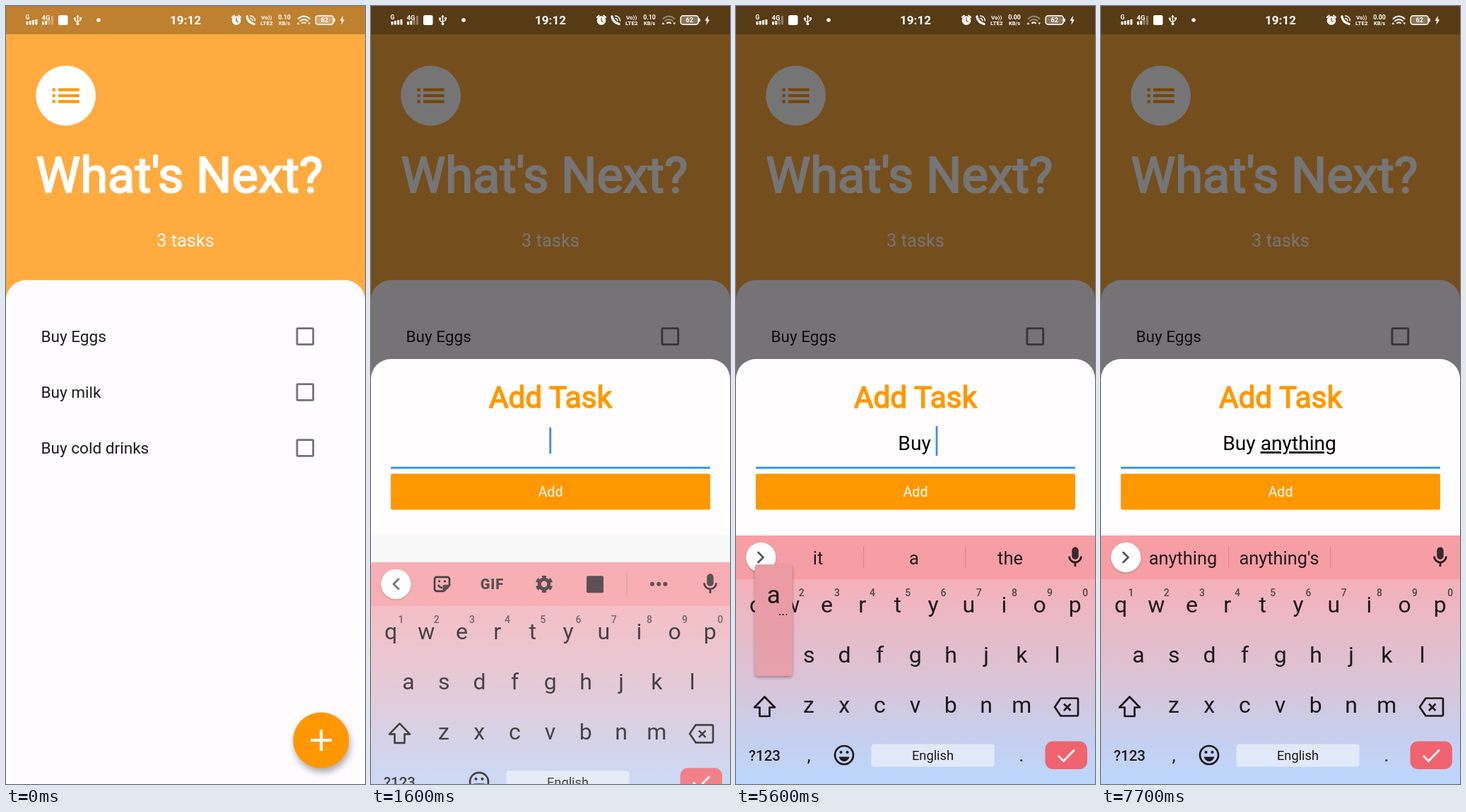
Recreate the animation shown at these times as an HTML page. Size 508 px wide and 1102 px high, loop 8 s.

```html
<!DOCTYPE html>
<html lang="en">
<head>
<meta charset="utf-8">
<title>Task list</title>
<style>
html, body { margin: 0; width: 100%; height: 100%; overflow: hidden; background: #fffcff; }
svg { display: block; }
text { font-family: Roboto, sans-serif; }
.mid { text-anchor: middle; }
.line { fill: none; stroke-linecap: round; stroke-linejoin: round; }
.faux { stroke-linejoin: round; }
.word { text-decoration: underline; text-decoration-skip-ink: none; }
.ink { fill: #1e181c; }
.icon { fill: #38282c; }
.pen { fill: none; stroke: #1e181c; stroke-width: 2.7; stroke-linejoin: round; }
</style>
</head>
<body>
<svg width="508" height="1102" viewBox="0 0 508 1102">
  <defs>
    <linearGradient id="sky" x1="0" y1="0" x2="0" y2="1">
      <stop offset="0" stop-color="#f5b1b9"/>
      <stop offset=".5" stop-color="#dac4d7"/>
      <stop offset=".8" stop-color="#c5d0f0"/>
      <stop offset="1" stop-color="#bcd7fe"/>
    </linearGradient>
    <linearGradient id="pop" x1="0" y1="0" x2="0" y2="1">
      <stop offset="0" stop-color="#ec9aa3"/>
      <stop offset="1" stop-color="#e5a1ad"/>
    </linearGradient>
  </defs>

  <!-- list screen -->
  <rect width="508" height="430" fill="#ffab40"/>
  <rect width="508" height="40" fill="#bf802f"/>
  <circle cx="84.6" cy="127" r="42.4" fill="#fff"/>
  <path transform="translate(59.2 101.6) scale(2.117)" fill="#ff9800"
    d="M3 7h2v2H3zM7 7h14v2H7zM3 11h2v2H3zM7 11h14v2H7zM3 15h2v2H3zM7 15h14v2H7z"/>
  <text class="faux" x="42.5" y="264" font-size="70.6" fill="#fff" stroke="#fff" stroke-width="2.2">What's Next?</text>
  <text class="mid" x="254" y="341" font-size="25.4" fill="#fff">3 tasks</text>
  <path d="M0 1102V416.500a28.200 28.200 0 0 1 28.200-28.200H479.800a28.200 28.200 0 0 1 28.200 28.200V1102z" fill="#fffcff"/>
  <g id="tasks" font-size="22.6" fill="#1c1b1f"></g>
  <g style="filter:drop-shadow(2px 6px 5px rgba(0,0,0,.32))">
    <circle cx="445.800" cy="1040" r="39.600" fill="#ff9800"/>
  </g>
  <path d="M431 1040h30M446 1025v30" stroke="#fff" stroke-width="4.100"/>

  <rect id="scrim" width="508" height="1102" opacity="0"/>

  <!-- status bar -->
  <g fill="#fff" font-weight="700">
    <text x="27.500" y="19" font-size="8.500">G</text>
    <path d="M28.500 22h3v4.500h-3zM32.800 21h3v5.500h-3zM37.100 20h3v6.500h-3zM41.400 19h3v7.500h-3z"/>
    <text x="50.500" y="19.500" font-size="9.500">4G</text>
    <path d="M51 22h3v4.500h-3zM55.300 21h3v5.500h-3z"/>
    <path d="M59.600 20h3v6.500h-3zM63.900 14h3v12.500h-3z" opacity=".35"/>
    <rect x="74" y="13" width="13.500" height="14" rx="2.500"/>
    <path class="line" d="M101.500 15v10M97.500 18v2.500l4 3M105.500 18v2l-4 2.500" stroke="#fff" stroke-width="1.400"/>
    <path d="M101.500 12.500l2.200 3.200h-4.400zM104 16h3v3h-3z"/>
    <circle cx="97.500" cy="18" r="1.700"/><circle cx="101.500" cy="25.300" r="1.900"/>
    <circle cx="131" cy="20" r="2.800"/>
    <text class="mid" x="254" y="26.300" font-size="17">19:12</text>
    <circle cx="326" cy="20.500" r="6.300"/>
    <path class="line" d="M319.800 16l3-2.500M332.200 16l-3-2.500" stroke="#fff" stroke-width="2"/>
    <path class="line" d="M326 17v4l2.500 1.500" stroke="#8a5f26" stroke-width="1.400"/>
    <path class="line" d="M341 15q1 8 10 10.500" stroke="#fff" stroke-width="3.300"/>
    <path class="line" d="M345.500 14q6 0 7 7M345.500 17.500q3 0 3.500 3.500" stroke="#fff" stroke-width="1.400"/>
    <text x="361" y="19" font-size="8">Vo))</text>
    <text x="360" y="26.500" font-size="8">LTE2</text>
    <text id="speed" class="mid" x="394" y="19" font-size="8.800">0.10</text>
    <text class="mid" x="394" y="26.500" font-size="7.500">KB/s</text>
    <g class="line" stroke="#fff" stroke-width="1.900">
      <path id="wifi" d="M413.500 18q8-7 16 0M416 21.300q5.500-4.500 11 0"/>
      <path d="M419 24.300q2.500-2 5 0"/>
    </g>
    <path d="M413.500 23l2 3h-4zM427.500 23.500h3.500l-1.700 3z"/>
    <rect x="438.200" y="13.700" width="25" height="12.600" rx="3.500" fill="#fff" fill-opacity=".3" stroke="#fff" stroke-width="1.500"/>
    <rect x="464" y="17.500" width="1.800" height="5" rx=".8"/>
    <text class="mid" x="450.700" y="23.300" font-size="9">62</text>
    <path d="M477 13.500l-4.500 7.200h2.700l-.8 6 4.700-7.500h-2.800z"/>
  </g>

  <!-- add-task sheet -->
  <g id="sheet">
    <rect y="240" width="508" height="362" fill="#f8f8f8"/>
    <path d="M0 250V28.200A28.200 28.200 0 0 1 28.200 0H479.800A28.200 28.200 0 0 1 508 28.200V250z" fill="#fffdfe"/>
    <text class="mid faux" x="254" y="69" font-size="42.300" fill="#ff9800" stroke="#ff9800" stroke-width="1.500">Add Task</text>
    <text id="field" class="mid" x="252.600" y="129" font-size="28.200"><tspan id="head"></tspan><tspan id="tail" class="word"></tspan></text>
    <rect id="caret" width="2.700" fill="#4285f4"/>
    <rect x="28" y="152.700" width="452" height="2.800" fill="#2196f3"/>
    <rect x="28" y="162.500" width="452" height="51" rx="2.800" fill="#ff9800"/>
    <text class="mid" x="254" y="195" font-size="19.750" fill="#fff">Add</text>
  </g>

  <!-- keyboard -->
  <g id="board">
    <rect y="750" width="508" height="62.500" fill="#f79ea5"/>
    <rect y="812" width="508" height="290" fill="url(#sky)"/>
    <circle cx="35.300" cy="781" r="21.200" fill="#fff" style="filter:drop-shadow(0 1px 1px rgba(0,0,0,.25))"/>
    <path id="chevron" class="line" stroke="#5b5356" stroke-width="2.800"/>
    <g id="tools" class="icon">
      <path class="pen" d="M93 771h15a3 3 0 0 1 3 3v9l-8 8h-10a3 3 0 0 1-3-3v-14a3 3 0 0 1 3-3z"/>
      <path d="M111 782v3l-6.500 6.500h-3v-6.500a3 3 0 0 1 3-3z"/>
      <path class="pen" stroke-width="2" d="M95 777h3M103 777h3M95 782q2 4 6 4"/>
      <text class="mid" x="171.500" y="788" font-size="20" font-weight="900" letter-spacing="1">GIF</text>
      <g fill="none" stroke="#38282c">
        <circle cx="245" cy="781" r="6.800" stroke-width="5"/>
        <circle cx="245" cy="781" r="10" stroke-width="4.400" pathLength="60" stroke-dasharray="5.500 4.500" stroke-dashoffset="-2.250"/>
      </g>
      <rect x="305" y="769.500" width="24" height="24" rx="2"/>
      <rect x="361.500" y="765" width="1" height="32" opacity=".25"/>
      <circle cx="398" cy="781" r="3"/><circle cx="407.200" cy="781" r="3"/><circle cx="416.400" cy="781" r="3"/>
    </g>
    <g id="hints" class="mid ink" font-size="25.400">
      <path d="M180.700 765v32M324.700 765v32" stroke="#38282c" stroke-opacity=".2"/>
      <text x="116" y="791"></text><text x="252" y="791"></text><text x="388" y="791"></text>
    </g>
    <rect class="icon" x="475.300" y="766.500" width="9.400" height="17.500" rx="4.700"/>
    <path class="pen" d="M471.500 779.500a8.500 8.500 0 0 0 17 0M480 788v6"/>
    <g id="keys" class="mid ink" font-size="32"></g>
    <path id="shift" class="pen" d="M40.500 978.500l14.500 15h-7.500v12.500h-14v-12.500h-7.500z"/>
    <path class="pen" d="M459.500 980.500h23a1.500 1.500 0 0 1 1.500 1.500v22a1.500 1.500 0 0 1-1.500 1.500h-23l-8.500-12.500zM464 988.500l9.500 9.500M473.500 988.500l-9.500 9.500"/>
    <g class="mid ink">
      <text x="40.500" y="1069" font-size="20.500" font-weight="500">?123</text>
      <text x="103" y="1070" font-size="26">,</text>
      <text x="404" y="1070" font-size="26">.</text>
      <circle class="pen" cx="153" cy="1061" r="13"/>
      <circle cx="148.500" cy="1057" r="2.100"/><circle cx="157.500" cy="1057" r="2.100"/>
      <path d="M145.500 1063.500h15q-2 6.500-7.500 6.500t-7.500-6.500z"/>
      <rect id="space" x="191.500" y="1045.500" width="174" height="32" rx="4" fill="#fff"/>
      <text x="278.500" y="1068" font-size="18.300">English</text>
    </g>
    <rect x="437.500" y="1041.500" width="59.500" height="39.500" rx="11" fill="#f0646f"/>
    <path d="M456 1062l7.500 7.500 15.500-16" fill="none" stroke="#fff" stroke-width="2.800"/>
    <g id="popup" class="mid ink">
      <rect x="-26.500" y="-129" width="53" height="158" rx="4.500" fill="url(#pop)" style="filter:drop-shadow(0 2px 2px rgba(60,20,30,.4))"/>
      <text y="-74" font-size="35"></text>
      <text x="13.500" y="-57" font-size="18">...</text>
    </g>
  </g>
</svg>
<script>
const LOOP = 8000, STEP = 100;
const OPEN = 1400, SHOWN = 1600, SHIFT = 3700;
const ROWS = [['qwertyuiop', 28], ['asdfghjkl', 53], ['zxcvbnm', 103]];

// [press, release, character]
const STROKES = [
  [4000, 4100, 'B'], [4200, 4300, 'u'], [4300, 4400, 'y'], [5000, 5200, ' '],
  [5600, 5700, 'a'], [5800, 5900, 'n'], [5900, 6000, 'y'], [6100, 6200, 't'],
  [6400, 6500, 'h'], [6600, 6700, 'i'], [6900, 7000, 'n'], [7100, 7200, 'g']
];
const HINTS = {
  B: 'B,Be,But', Bu: 'Bu,But,Buy', Buy: 'Buy,But,Busy', '': 'it,a,the',
  a: 'a,and,at', an: 'an,and,any', any: 'any,anything,anyway',
  anyt: 'anyt,anything,anytime', anyth: 'anyth,anything,anything\'s',
  anythi: 'anythi,anything,anything\'s', anythin: 'anythin,anything,anything\'s',
  anything: 'anything,anything\'s,'
};

const $ = id => document.getElementById(id);
const set = (el, attrs) => { for (const k in attrs) el.setAttribute(k, attrs[k]); return el; };
const add = (parent, tag, attrs, text = '') => {
  const el = set(document.createElementNS('http://www.w3.org/2000/svg', tag), attrs);
  el.textContent = text;
  return parent.appendChild(el);
};
const show = (el, on) => { el.style.display = on ? '' : 'none'; };
const clamp = v => Math.min(1, Math.max(0, v));

['Buy Eggs', 'Buy milk', 'Buy cold drinks'].forEach((name, i) => {
  const y = 468 + 79 * i;
  add($('tasks'), 'text', { x: 49.4, y: y + 8 }, name);
  add($('tasks'), 'rect', { x: 411.9, y: y - 11.4, width: 22.8, height: 22.8, rx: 1,
    fill: 'none', stroke: '#737077', 'stroke-width': 2.8 });
});

const keys = {};
ROWS.forEach(([letters, left], row) => [...letters].forEach((c, i) => {
  const x = left + 50.2 * i, y = 849 + 71 * row;
  keys[c] = { x, y, el: add($('keys'), 'text', { x, y: y + 10 }, c) };
  if (!row) add($('keys'), 'text',
    { x: x + 14.5, y: 836, 'font-size': 14, 'font-weight': 500, fill: '#54464b' }, (i + 1) % 10);
}));

function drawField(t) {
  const done = STROKES.filter(s => s[1] <= t);
  const text = done.map(s => s[2]).join('');
  const cut = text.lastIndexOf(' ') + 1;
  const word = text.slice(cut), before = text.slice(0, cut);
  const resting = text.endsWith(' ');
  $('head').textContent = resting ? before.trim() : before;
  $('tail').textContent = word;

  const edited = done.length ? done[done.length - 1][1] : SHOWN;
  const width = text ? $('field').getComputedTextLength() : 0;
  set($('caret'), { x: 252.4 + width / 2 + (resting ? 7 : 0), y: text ? 95 : 97, height: text ? 42 : 37 });
  show($('caret'), t >= SHOWN && Math.floor((t - edited) / 500) % 2 === 0);

  show($('tools'), !text);
  show($('hints'), text);
  set($('chevron'), { d: text ? 'M31.500 774l7 7-7 7' : 'M39 774l-7 7 7 7' });
  const hints = HINTS[word].split(',');
  $('hints').querySelectorAll('text').forEach((el, i) => { el.textContent = hints[i]; });
}

function drawKeys(t) {
  const upper = t >= SHIFT && t < STROKES[0][1];
  for (const c in keys) keys[c].el.textContent = upper ? c.toUpperCase() : c;
  $('shift').style.fill = upper ? '#1e181c' : 'none';

  const down = STROKES.find(s => s[0] <= t && t < s[1]);
  const c = down ? down[2] : '';
  const key = keys[c.toLowerCase()];
  set($('space'), { 'fill-opacity': c === ' ' ? .8 : .52 });
  show($('popup'), key);
  if (!key) return;
  set($('popup'), { transform: `translate(${key.x + .3} ${key.y})` });
  const [letter, more] = $('popup').querySelectorAll('text');
  letter.textContent = c;
  show(more, !'Bhg'.includes(c));
}

function draw(now) {
  const t = Math.floor(now % LOOP / STEP) * STEP;
  const open = clamp((t - OPEN) / 200);
  const rise = clamp((t - 1500) / 300);
  set($('scrim'), { opacity: .54 * open });
  set($('sheet'), { transform: `translate(0 ${500 + 602 * (1 - open) ** 1.5})` });
  set($('board'), {
    transform: `translate(0 ${352 * (1 - rise) ** 5.5})`,
    opacity: 1 - (1 - rise) ** 4
  });
  show($('sheet'), open);
  show($('board'), rise);
  $('speed').textContent = t < 2000 ? '0.10' : '0.00';
  const faint = (t >= 1100 && t < 2100) || (t >= 5600 && t < 6200);
  set($('wifi'), { opacity: faint ? .4 : 1 });
  drawField(t);
  drawKeys(t);
}

function tick() {
  draw(performance.now());
  requestAnimationFrame(tick);
}
tick();
</script>
</body>
</html>
```
